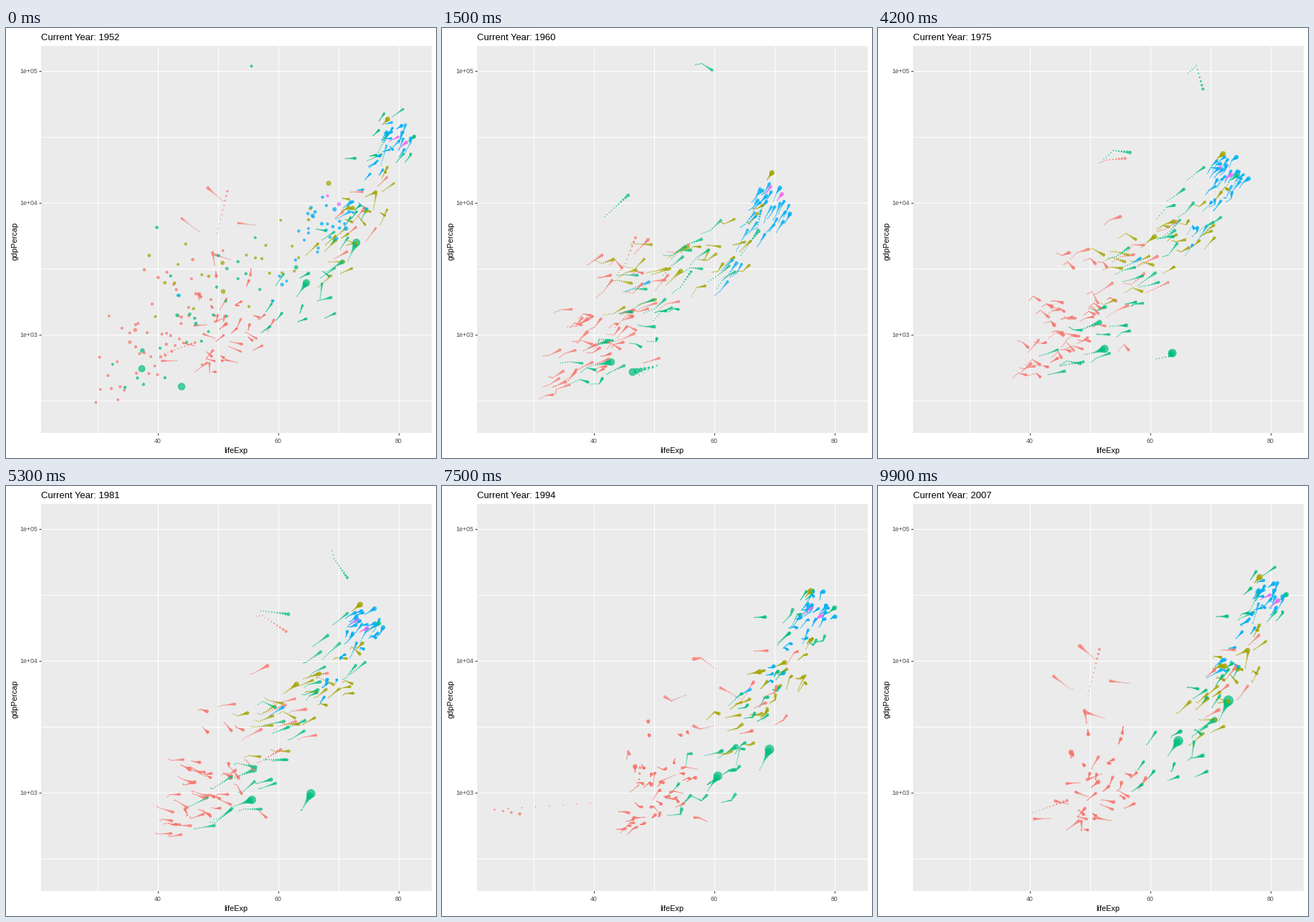
Animation, 600 px wide and 600 px high, one loop 10000 ms. Source, as a matplotlib script:

```python
import numpy as np
import matplotlib.pyplot as plt
from matplotlib.animation import FuncAnimation
from matplotlib.colors import to_rgba
from matplotlib.patches import Rectangle

SIZE, DPI, FRAMES, WAKE = 600, 100, 100, 10
PT = 72 / DPI  # points per pixel
LEFT, RIGHT, TOP, BOTTOM = 48.6, 594.5, 25.0, 565.3

# colour and the share of the final population present at the start
CONTINENTS = {
    "Africa": ("#F8766D", .27),
    "Americas": ("#A3A500", .45),
    "Asia": ("#00BF7D", .40),
    "Europe": ("#00B0F6", .75),
    "Oceania": ("#E76BF3", .47),
}

# Five-year steps of a track, by its number of points
STEPS = {4: (0, 4, 7, 11), 6: (0, 5, 7, 8, 9, 11), 8: (0, 1, 2, 3, 4, 5, 7, 11)}

# Conspicuous countries: population in millions, then life and GDP per point
LANDMARKS = [
    ("Africa", 135, 36.3, 1077, 42.8, 1698, 46.9, 1385, 46.9, 2014),
    ("Africa", 9, 40, 493, 45, 670, 44, 848, 23.6, 737, 36.1, 590, 46.2, 863),
    ("Africa", .5, 34.5, 376, 42, 959, 45.7, 967, 47.5, 1132, 48.2, 2814, 51.6, 12154),
    ("Africa", 6, 42.7, 2388, 45.3, 3448, 47.8, 6757, 50.2, 18773,
     52.8, 21011, 57.4, 21951, 66.2, 11771, 74, 12057),
    ("Americas", 190, 50.9, 2109, 59.5, 4986, 65.2, 7807, 72.4, 9066),
    ("Americas", 109, 50.8, 3478, 62.4, 6809, 69.5, 8688, 76.2, 11978),
    ("Americas", 301, 68.4, 13990, 71.3, 21806, 75, 29884, 78.2, 42952),
    ("Asia", 1318, 44, 400, 50.5, 576, 44.5, 488, 58.4, 613,
     63.1, 677, 64, 741, 67.3, 1379, 73, 4959),
    ("Asia", 1110, 37.4, 547, 50.7, 724, 58.6, 977, 64.7, 2452),
    ("Asia", 223, 37.5, 750, 49.2, 1111, 60.1, 1748, 70.7, 3541),
    ("Asia", 127, 63, 3217, 73.4, 14779, 78.7, 22376, 82.6, 31656),
    ("Asia", 28, 39.9, 6460, 53.9, 24837, 66.3, 21198, 72.8, 21655),
    ("Asia", 2.5, 55.6, 108382, 58, 113523, 60.5, 95458, 64.6, 80895,
     67.7, 109348, 69.3, 59265, 74.2, 28118, 77.6, 47307),
]

# Everyone else: number of countries, spread in years, then the group's mean track
GROUPS = [
    ("Africa", 24, 4.5, 37, 700, 44.5, 950, 49.5, 850, 53, 950),
    ("Africa", 6, 3.5, 42, 800, 50.5, 1050, 54.5, 950, 47, 950),
    ("Africa", 4, 3, 44, 1900, 52.5, 4200, 60.5, 5100, 48.5, 7000),
    ("Africa", 8, 4, 39, 1900, 47, 2600, 51, 2200, 52, 2400),
    ("Africa", 6, 3, 46, 1800, 58, 2900, 67, 4300, 73.3, 7000),
    ("Americas", 13, 3.5, 60, 4100, 67, 6300, 71.5, 7300, 75.3, 10200),
    ("Americas", 9, 3, 43.5, 2600, 55, 3400, 62.5, 3300, 70.5, 4400),
    ("Asia", 12, 5.5, 42, 750, 50.5, 950, 58, 1150, 65, 1950),
    ("Asia", 8, 3.5, 47.5, 2100, 59, 3700, 66.5, 4900, 71, 7300),
    ("Asia", 7, 3, 54.5, 2600, 66, 8500, 73, 16500, 79, 31000),
    ("Europe", 19, 2, 68, 7000, 72.3, 15500, 76, 22000, 79.6, 32500),
    ("Europe", 10, 2.4, 63, 3900, 70, 8800, 71.3, 11500, 75, 13500),
    ("Europe", 1, 0, 43.6, 1969, 57, 3451, 63.1, 5089, 71.8, 8458),
    ("Oceania", 2, .6, 69.2, 10300, 71.9, 16400, 75.3, 20400, 80.7, 29500),
]

rng = np.random.default_rng(7)
step = np.linspace(0, 11, FRAMES)


def mean_track(pairs):
    keys = STEPS[len(pairs) // 2]
    return (np.interp(step, keys, pairs[::2]),
            np.interp(step, keys, np.log10(pairs[1::2])))


def drift(z):
    """A deviation that changes slowly and shrinks over the years."""
    end = .65 * z + .35 * rng.normal()
    return np.interp(step, [0, 11], [z, end])


def wobble(scale):
    return np.interp(step, range(12), rng.normal(0, scale, 12))


def countries():
    """Yield continent, final population, life and log GDP over all frames."""
    for name, pop, *pairs in LANDMARKS:
        yield name, pop, *mean_track(pairs)
    for name, count, spread, *pairs in GROUPS:
        life, gdp = mean_track(pairs)
        gdp_spread = min(.18, .07 * spread)
        even = np.linspace(-1.6, 1.6, count)
        for a, b in zip(rng.permutation(even), rng.permutation(even)):
            pop = np.clip(rng.lognormal(2.2, 1.1), .3, 85)
            yield (name, pop,
                   np.minimum(life + spread * drift(a) + wobble(.08 * spread), 82),
                   gdp + gdp_spread * drift(.4 * a + .85 * b) + wobble(.16 * gdp_spread))


def x_px(life):
    return LEFT + (life - 20.649) * (RIGHT - LEFT) / 64.904


def y_px(log_gdp):
    return BOTTOM - (log_gdp - 2.2487) * (BOTTOM - TOP) / 2.940


def build_tracks():
    """Pixel positions and point sizes, indexed by frame then country."""
    xs, ys, sizes, colors = [], [], [], []
    for name, pop, life, gdp in countries():
        color, start = CONTINENTS[name]
        xs.append(x_px(life))
        ys.append(y_px(gdp))
        sizes.append(1 + 5 * np.sqrt(pop * start ** (1 - step / 11) / 1318))
        colors.append(to_rgba(color, .7))
    return np.stack([np.transpose(xs), np.transpose(ys)], -1), np.transpose(sizes), colors


def area(size):
    return (.75 * (2.845 * size + .945) * PT) ** 2


pos, size, colors = build_tracks()
ages = np.arange(WAKE, -1, -1)
falloff = ((1 - ages / WAKE) ** 3)[:, None]

plt.rcParams["font.family"] = "Liberation Sans"
fig = plt.figure(figsize=(SIZE / DPI, SIZE / DPI), dpi=DPI, facecolor="white")
ax = fig.add_axes([0, 0, 1, 1])
ax.set(xlim=(0, SIZE), ylim=(SIZE, 0))
ax.axis("off")
ax.add_patch(Rectangle((49, 25), 545, 540, color="#EBEBEB", lw=0))


def line(x, y, color):
    ax.plot(x, y, color=color, lw=PT, solid_capstyle="butt", zorder=1)


def label(x, y, text, px, color="black", **kw):
    return ax.text(x, y, text, fontsize=px * PT, color=color, **kw)


for life in range(30, 81, 10):
    x = int(x_px(life)) + .5
    line([x, x], [25, 565], "white")
    if life % 20 == 0:
        line([x, x], [565, 568], "#333333")
        label(x, 579, str(life), 8.8, "#4D4D4D", ha="center")
for half in range(5, 11):
    y = int(y_px(half / 2)) + .5
    line([49, 594], [y, y], "white")
    if half % 2 == 0:
        line([46, 49], [y, y], "#333333")
        label(44, y + 3.5, f"1e+0{half // 2}", 8.8, "#4D4D4D", ha="right")

label(321, 593, "lifeExp", 11, ha="center")
label(12.5, 297, "gdpPercap", 11, ha="center", va="center", rotation=90)
title = label(49, 17, "", 13)

rgba = np.tile(colors, (WAKE + 1, 1))
blank = np.zeros(len(rgba))
dots = ax.scatter(blank, blank, s=1, facecolors=rgba, edgecolors=rgba,
                  linewidths=.8 * PT, zorder=2)


def update(i):
    shown = (i - ages) % FRAMES
    dots.set_offsets(pos[shown].reshape(-1, 2))
    dots.set_sizes(area(size[shown] * falloff).ravel())
    title.set_text(f"Current Year: {round(1952 + 55 * i / (FRAMES - 1))}")
    return dots, title


anim = FuncAnimation(fig, update, frames=FRAMES, interval=100, repeat=True)
plt.show()
```
